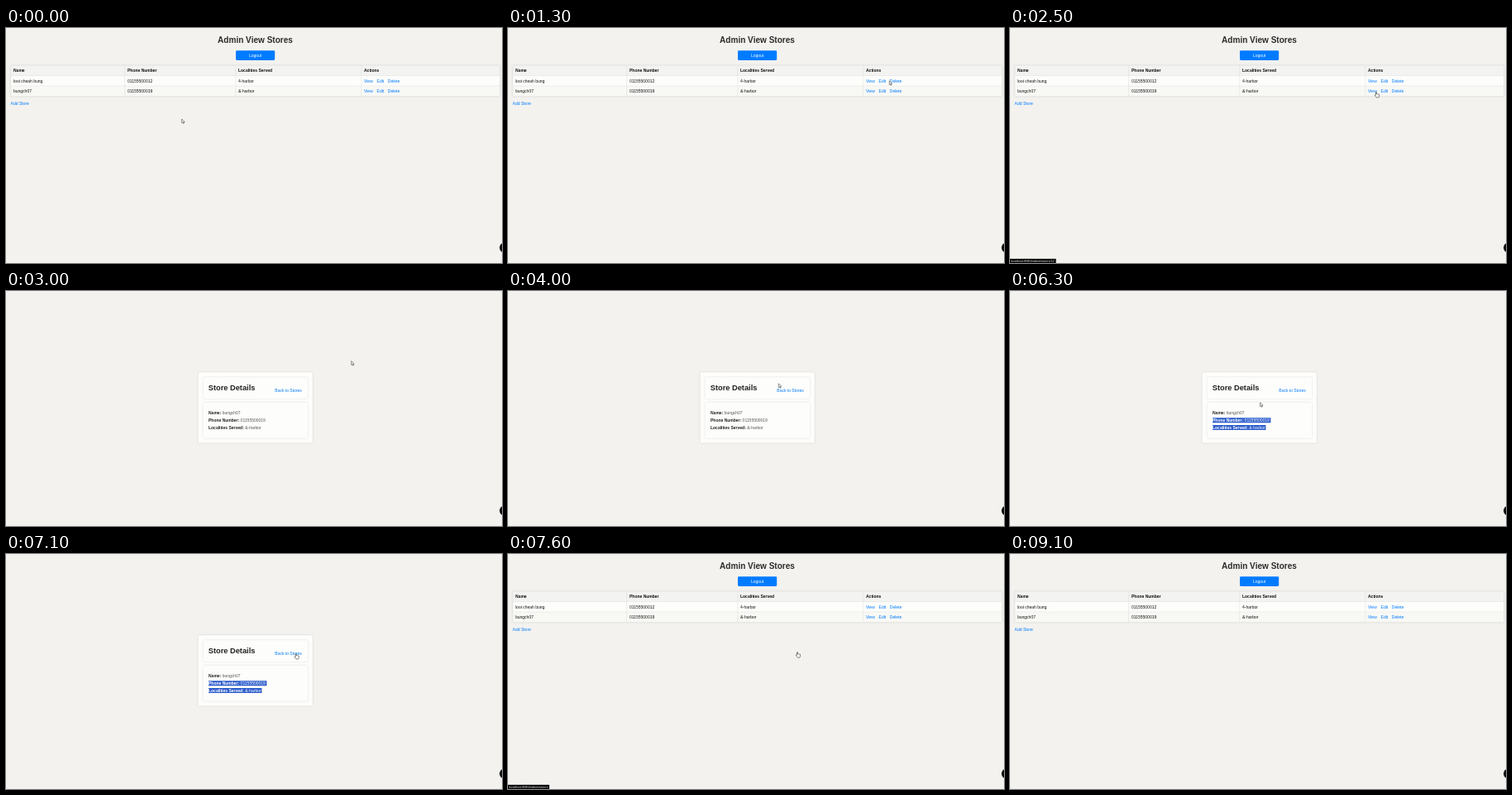
Recreate the animation shown at these times as an HTML page. Size 600 by 284 pixels, loop 9300 ms.

```html
<!DOCTYPE html>
<html lang="en">
<head>
<meta charset="utf-8">
<title>Admin View Stores</title>
<style>
  html, body { margin: 0; width: 100%; height: 100%; overflow: hidden; background: #f3f2ef; }
  svg { display: block; width: 600px; height: 284px; }
  text { font: 5px "Liberation Sans", Arial, sans-serif; fill: #111; white-space: pre; }
  .b { font-weight: bold; }
  .link { fill: #007bff; }
  .mid { text-anchor: middle; }
  .line { stroke: #dcdcda; stroke-width: .5; fill: none; }
  .panel { fill: #fdfdfb; filter: drop-shadow(0 0 1.3px rgba(0, 0, 0, .13)); }
  #lines text, #chosen text { fill: #555; }
  #lines .b { fill: #222; }
  #chosen text, #chosen .b { fill: #fff; }
</style>
</head>
<body>
<svg viewBox="0 0 600 284" xmlns="http://www.w3.org/2000/svg">
  <defs>
    <clipPath id="range"><rect id="sel1" y="153.2" height="6"/><rect id="sel2" y="162.1" height="6"/></clipPath>
  </defs>
  <rect width="600" height="284" fill="#f3f2ef"/>

  <g id="list">
    <text class="b mid" x="301.5" y="18.3" style="font-size:10.05px;fill:#2c2c2c">Admin View Stores</text>
    <rect x="278" y="27.2" width="47.2" height="11.8" rx="1.4" fill="#007bff"/>
    <text class="mid" x="301.6" y="34.8" style="fill:#fff">Logout</text>
    <rect class="panel" x="5.7" y="45.3" width="591.8" height="37.2"/>
    <rect x="5.7" y="45.3" width="591.8" height="12.2" fill="#f3f3f1"/>
    <rect x="5.7" y="70" width="591.8" height="12.5" fill="#f8f8f5"/>
    <path class="line" d="M5.7 45.3H597.5V82.5H5.7ZM5.7 57.5H597.5M5.7 70H597.5M143.6 45.3V82.5M277.8 45.3V82.5M429.8 45.3V82.5"/>
    <g id="cells"></g>
    <text class="link" x="5.6" y="93.2">Add Store</text>
  </g>

  <g id="details">
    <rect class="panel" x="232.6" y="98.2" width="138.2" height="85.4" rx="1.6"/>
    <rect class="panel" x="238.6" y="104.3" width="126.4" height="25.6" rx="1.6"/>
    <rect class="panel" x="238.6" y="134.8" width="126.4" height="43" rx="1.6"/>
    <text class="b" x="244.8" y="120" style="font-size:9.25px;fill:#222">Store Details</text>
    <text class="link" x="325.3" y="121.5">Back to Stores</text>
    <g id="lines"></g>
    <g id="chosen" clip-path="url(#range)"></g>
  </g>

  <g id="status">
    <rect id="bar" y="278.9" height="5.1" fill="#000"/>
    <text id="url" x="1" y="283.1" style="font-size:3.8px;fill:#eee"></text>
  </g>
  <circle cx="603" cy="265.5" r="6" fill="#0c0c0c"/>

  <g id="cursor" stroke-linejoin="round">
    <path id="arrow" d="M0 0V4.8L1.15 3.8L1.95 5.6L2.75 5.2L1.95 3.5H3.4Z" fill="#fff" stroke="#222" stroke-width=".5"/>
    <path id="hand" d="M-.5 .6Q0 -.2 .5 .6V2.6Q1 2 1.5 2.7Q2 2.2 2.5 2.9Q3.3 2.5 3.5 3.4V5Q3.4 6.2 2.8 7H.4Q-.4 5.8 -1.7 4.3Q-1.8 3.3 -.5 4.1Z" fill="#fff" stroke="#222" stroke-width=".55"/>
    <path id="beam" d="M-1 -2.7H1M0 -2.7V2.7M-1 2.7H1" fill="none" stroke="#333" stroke-width=".5"/>
  </g>
</svg>
<script>
const LOOP = 9300, STEP = 100;
const $ = id => document.getElementById(id);
const show = (id, on) => $(id).setAttribute("display", on ? "inline" : "none");
const text = (x, y, s, cls = "") => `<text class="${cls}" x="${x}" y="${y}">${s}</text>`;

const stores = [
  ["looi cheah bung", "01155500012", "4-harbor"],
  ["bungch07", "01155500019", "&amp;-harbor"]
];
const cols = [9, 147, 281, 433];
const actions = [["View", 433], ["Edit", 448.6], ["Delete", 461.8]];

$("cells").innerHTML =
  ["Name", "Phone Number", "Localities Served", "Actions"].map((s, i) => text(cols[i], 53.3, s, "b")).join("") +
  stores.map((row, r) => {
    const y = 65.6 + r * 12.3;
    return row.map((s, i) => text(cols[i], y, s)).join("") +
      actions.map(([s, x]) => text(x, y, s, "link")).join("");
  }).join("");

const fields = ["Name:", "Phone Number:", "Localities Served:"]
  .map((label, i) => text(245, 149.2 + i * 8.9, `<tspan class="b">${label}</tspan> ${stores[1][i]}`)).join("");
$("lines").innerHTML = fields;
$("chosen").innerHTML = `<rect x="240" y="150" width="90" height="22" fill="#2a5bcb"/>` + fields;

// time, x, y, pointer shape from that time on
const path = [
  [0, 212.7, 110, "arrow"], [300, 228, 116, "arrow"], [700, 350, 90, "arrow"], [1000, 440, 70, "arrow"],
  [1200, 458, 63, "arrow"], [1600, 471, 66, "arrow"], [2000, 464, 74, "arrow"], [2200, 456, 76, "hand"],
  [2300, 443, 77, "hand"], [2800, 443, 77, "arrow"], [3300, 380, 96, "arrow"], [3800, 331, 113, "arrow"],
  [4000, 327.3, 111.8, "arrow"], [4300, 318, 98, "arrow"], [4600, 303, 125, "arrow"], [4800, 308, 139, "arrow"],
  [5000, 311, 162, "beam"], [5100, 309, 165, "beam"], [5200, 300, 164.5, "beam"], [5300, 290, 160, "beam"],
  [5400, 279, 157, "beam"], [5500, 267.5, 157, "beam"], [5700, 234, 156, "beam"], [5800, 226, 155, "arrow"],
  [5900, 236, 152, "arrow"], [6300, 302.6, 134.8, "arrow"], [6800, 344, 118, "hand"], [7000, 351, 121, "hand"],
  [7300, 350, 118.2, "hand"], [7600, 350, 118.2, "hand"], [7700, 352, 125, "arrow"], [8300, 420, 290, "arrow"],
  [LOOP, 420, 290, "arrow"]
];

function pointer(t) {
  const i = path.findIndex((p, k) => k + 1 === path.length - 1 || t < path[k + 1][0]);
  const [t0, x0, y0, kind] = path[i], [t1, x1, y1] = path[i + 1];
  const k = (t - t0) / (t1 - t0);
  return { x: x0 + (x1 - x0) * k, y: y0 + (y1 - y0) * k, kind };
}

function span(id, from, to) {
  $(id).setAttribute("x", from);
  $(id).setAttribute("width", Math.max(0, to - from));
}

// the selection trails the drag by one step
function select(t) {
  const p = pointer(Math.min(t - STEP, 5800));
  const start = Math.max(245, p.x), upper = p.y < 161;
  const on = t > 5100;
  span("sel1", start, on && upper ? 315.4 : 0);
  span("sel2", upper ? 245 : start, on ? 309.4 : 0);
}

function draw(t) {
  const inside = t >= 2600 && t < 7600;
  show("list", !inside);
  show("details", inside);
  if (inside) select(t);

  const first = t >= 2300 && t < 2900, second = t >= 7500 && t < 7900;
  show("status", first || second);
  $("url").textContent = "localhost:8080/admin/stores" + (first ? "/12" : "");
  $("bar").setAttribute("width", first ? 55.6 : 50);

  const p = pointer(t);
  $("cursor").setAttribute("transform", `translate(${p.x} ${p.y})`);
  for (const kind of ["arrow", "hand", "beam"]) show(kind, kind === p.kind);
}

const begin = performance.now();
function tick() {
  const t = (performance.now() - begin) % LOOP;
  draw(Math.floor(t / STEP) * STEP);
  requestAnimationFrame(tick);
}
tick();
</script>
</body>
</html>
```
